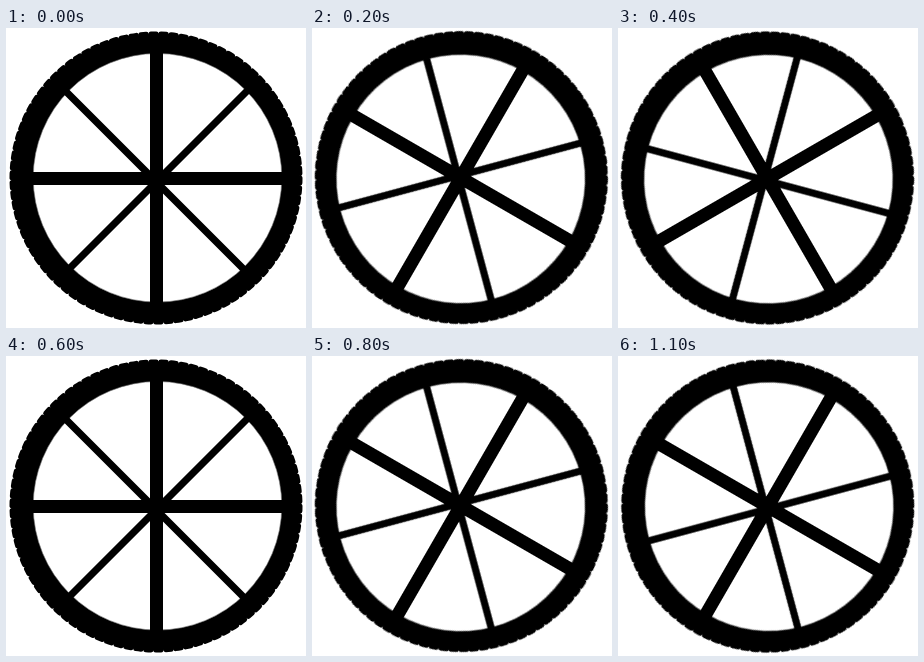
Animation, 300 px wide and 300 px high, one loop 1.2 s. Source, as an HTML page:

```html
<!DOCTYPE html>
<html lang="en">
<head>
<meta charset="utf-8">
<title>Turning wheel</title>
<style>
  html, body { margin: 0; width: 100%; height: 100%; overflow: hidden; background: #fff; }
  svg { display: block; width: 100vw; height: 100vh; }
  #wheel { transform-origin: 149.8px 149.6px; }
  .spoke { stroke: #000; fill: none; }
</style>
</head>
<body>
<svg viewBox="0 0 300 300">
  <g id="wheel">
    <circle cx="150" cy="150" r="144"/>
    <!-- tread: rounded knobs with shallow notches between them -->
    <circle cx="150" cy="150" r="144" fill="none" stroke="#000" stroke-width="5"
            stroke-linecap="round" pathLength="900" stroke-dasharray="5.2 4.8"/>
    <circle cx="151.5" cy="149.8" r="124.3" fill="#fff" stroke="#777" stroke-width=".6"/>
    <path class="spoke" stroke-width="13" d="M150.5 20V280M20 150.5H280"/>
    <path class="spoke" stroke-width="7.2" d="M58 61.5L242 245.5M244 60L60 244"/>
  </g>
</svg>
<script>
  const STEP = 100;
  const angles = [0, 150, 120, 0, 60, 30];

  const frames = angles.map((a, i) => ({
    transform: `rotate(${a}deg)`,
    offset: i / angles.length,
    easing: 'steps(1, end)'
  }));
  frames.push({ transform: `rotate(${angles[0]}deg)`, offset: 1 });

  document.getElementById('wheel').animate(frames, {
    duration: STEP * angles.length,
    iterations: Infinity
  });
</script>
</body>
</html>
```
